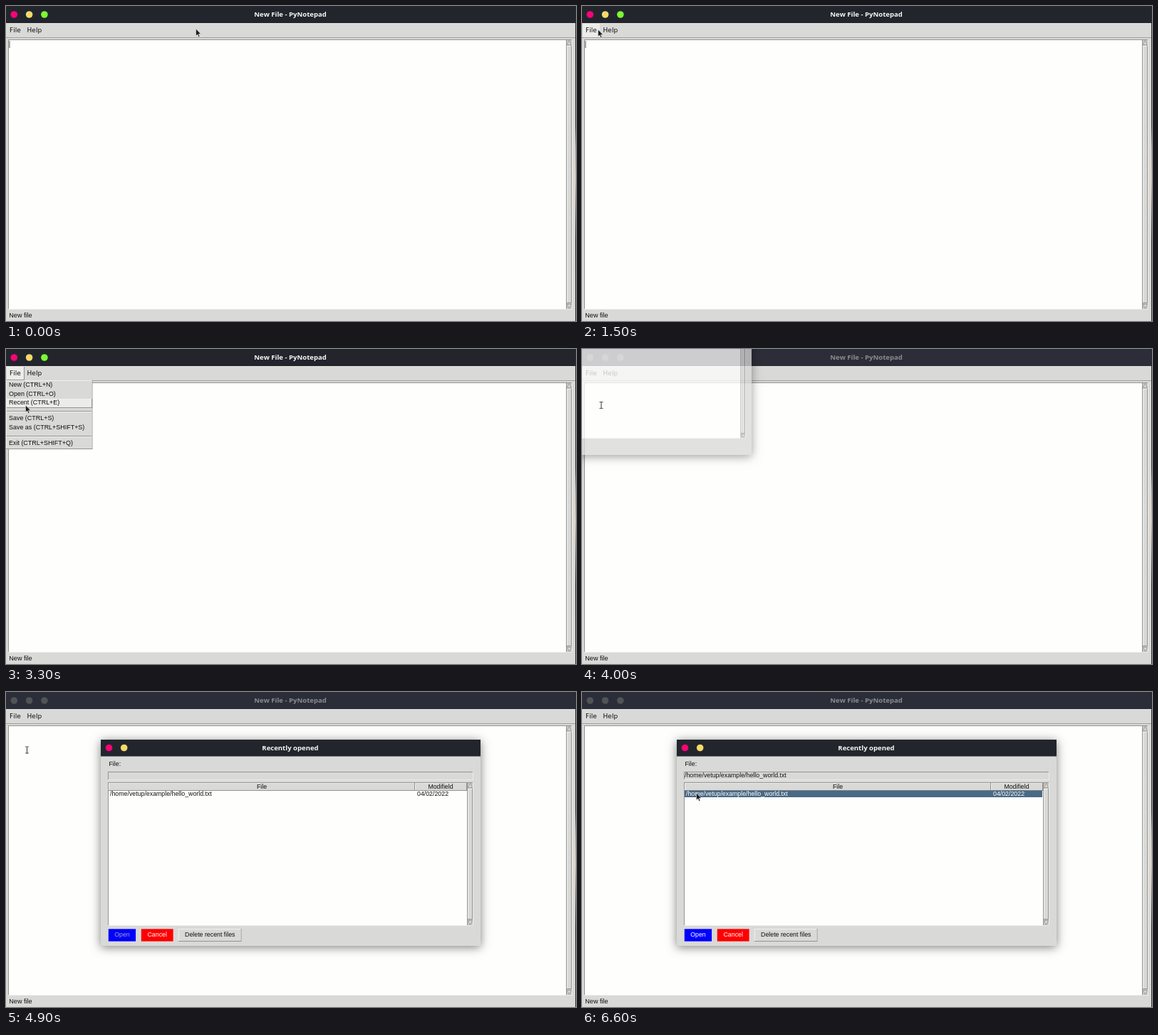
An HTML page with a canvas for the animation above (8 s loop, 800 by 443 pixels).

```html
<!DOCTYPE html>
<html lang="en">
<head>
<meta charset="utf-8">
<title>PyNotepad</title>
<style>
  html, body { margin: 0; width: 100%; height: 100%; overflow: hidden; }
  canvas { display: block; }
</style>
</head>
<body>
<canvas id="stage" width="800" height="443"></canvas>
<script>
const LOOP = 8000, STEP = 100;
const GRAY = '#d9d9d7', LIGHT = '#ececea', DARK = '#939391', WHITE = '#fefefd', INK = '#101010';
const SANS = '"Liberation Sans", Arial, sans-serif';
const BODY_FONT = '8.8px ' + SANS;
const MENU_FONT = '8.95px ' + SANS;
const BAR_FONT = '9px "DejaVu Sans", sans-serif';
const TITLE_FONT = 'bold 9.55px "Noto Sans", sans-serif';
const PATH = '/home/vetup/example/hello_world.txt';
const DIALOG = { x: 133, y: 67, w: 533, h: 290 };

const MENU = [
  ['New (CTRL+N)', 45], ['Open (CTRL+O)', 57.5], ['Recent (CTRL+E)', 70],
  ['Save (CTRL+S)', 92], ['Save as (CTRL+SHIFT+S)', 104.5], ['Exit (CTRL+SHIFT+Q)', 126.5]
];

// Pointer path: time, x, y
const POINTER = [
  [0, 266, 32], [400, 266, 32], [600, 245, 32], [900, 152, 32], [1200, 58, 33],
  [1300, 38, 33], [1400, 24, 33], [1500, 22, 33], [2800, 22, 33], [2900, 23, 42],
  [3100, 26, 78], [3200, 27, 89], [3300, 27, 79], [4800, 27, 79], [4900, 29.5, 81.5],
  [5100, 58, 97], [5400, 130, 124], [5500, 150, 133], [5600, 158, 139], [5700, 160, 142],
  [LOOP, 160, 142]
];

const screen = document.getElementById('stage').getContext('2d');
const layer = document.createElement('canvas');
layer.width = DIALOG.w;
layer.height = DIALOG.h;
const dialogContext = layer.getContext('2d');
let c = screen;

function box(x, y, w, h, color) {
  c.fillStyle = color;
  c.fillRect(x, y, w, h);
}

function bevel(x, y, w, h, fill, sunken = false) {
  box(x, y, w, h, sunken ? LIGHT : DARK);
  box(x, y, w - 1, h - 1, sunken ? DARK : '#f0f0ee');
  box(x + 1, y + 1, w - 2, h - 2, fill);
}

function text(string, x, y, font = BODY_FONT, color = INK, align = 'left') {
  c.font = font;
  c.fillStyle = color;
  c.textAlign = align;
  c.fontKerning = 'none';
  c.fillText(string, x, y);
}

function dot(x, y, color) {
  c.fillStyle = color;
  c.beginPath();
  c.arc(x, y, 4.8, 0, 7);
  c.fill();
}

function shape(points, fill, stroke, width = 1) {
  c.beginPath();
  points.forEach(([x, y]) => c.lineTo(x, y));
  c.closePath();
  c.fillStyle = fill;
  c.fill();
  c.strokeStyle = stroke;
  c.lineWidth = width;
  c.stroke();
}

function scrollbar(x, top, bottom) {
  const mid = x + 4.5;
  bevel(x, top, 9, bottom - top, '#c6c6c4', true);
  bevel(x + 1, top + 9, 7, bottom - top - 18, GRAY);
  shape([[mid, top + 1.5], [x + 7.5, top + 7.5], [x + 1.5, top + 7.5]], GRAY, DARK, 0.8);
  shape([[mid, bottom - 1.5], [x + 7.5, bottom - 7.5], [x + 1.5, bottom - 7.5]], GRAY, DARK, 0.8);
}

function pointerAt(t) {
  const i = POINTER.findIndex(key => key[0] > t);
  const [t0, x0, y0] = POINTER[i - 1], [t1, x1, y1] = POINTER[i];
  const k = (t - t0) / (t1 - t0);
  return { x: x0 + (x1 - x0) * k, y: y0 + (y1 - y0) * k };
}

function drawPointer({ x, y }, beam) {
  c.save();
  c.translate(x, y);
  if (beam) {
    box(-0.5, -4, 1, 9, '#333');
    box(-2.5, -5, 5, 1, '#555');
    box(-2.5, 4, 5, 1, '#555');
  } else {
    shape([[0.5, 0], [0.5, 10], [2.8, 8], [4.3, 11.6], [5.9, 10.9], [4.4, 7.4], [7.4, 7.2]],
      '#1c1c1c', 'rgba(235,235,235,.75)', 0.8);
  }
  c.restore();
}

function drawWindow(t, pointer) {
  const focused = t < 4000;
  const menuOpen = t >= 1800 && t < 3900;
  const caretOn = focused && (t + 300) % 900 < 600;
  box(0, 0, 800, 443, GRAY);
  box(0, 0, 799, 24, focused ? '#22262c' : '#2b2e38');
  const dots = focused ? ['#fb0276', '#f4da68', '#7cfa35'] : Array(3).fill('#525357');
  dots.forEach((color, i) => dot(11.3 + 21.3 * i, 12, color));
  text('New File - PyNotepad', 399, 15.3, TITLE_FONT, focused ? '#f6f6f6' : '#8b8c90', 'center');

  box(0, 24, 799, 1, '#e2e2e0');
  box(0, 44.2, 799, 0.8, DARK);
  if (menuOpen) bevel(1, 25, 25, 19, LIGHT);
  else if (t < 1800 && pointer.x < 25) box(1, 25, 24, 19, LIGHT);
  else if (t < 1800 && pointer.x < 54) box(25, 25, 29, 19, LIGHT);
  text('File', 5, 37.2, BAR_FONT);
  text('Help', 29.6, 37.2, BAR_FONT);

  bevel(3, 47, 793, 380, WHITE, true);
  scrollbar(786, 47, 427);
  box(795, 46, 4, 382, GRAY);
  text('New file', 4.3, 438.3, '9.1px ' + SANS);

  const edge = c.createLinearGradient(0, 0, 0, 443);
  [[0, '#25282d'], [0.38, '#3a3a3c'], [0.45, '#a09890'], [0.55, '#d8b89a'], [0.65, '#77716c'], [0.75, '#25282d'], [1, '#333']]
    .forEach(([stop, color]) => edge.addColorStop(stop, color));
  box(799, 0, 1, 443, edge);

  if (caretOn) box(4.5, 49, 1, 10, '#555');
  if (menuOpen) drawMenu(t, pointer);
}

function drawMenu(t, pointer) {
  bevel(0, 44, 121.5, 97, GRAY);
  for (const y of [87, 122]) {
    box(1, y, 119, 1, DARK);
    box(1, y + 1, 119, 1, '#f4f4f2');
  }
  for (const [label, y] of MENU) {
    const hovered = pointer.y >= y && pointer.y < y + 12.5;
    const first = y === 45 && t >= 1900 && pointer.y < 45;
    const nearSave = y === 92 && pointer.y > 88;
    if (hovered || first || nearSave) bevel(1, Math.floor(y), 120, 13, LIGHT);
    text(label, 4, y + 8.3, MENU_FONT);
  }
}

function button(label, x, w, fill, color) {
  if (fill === GRAY) bevel(x, 333, w, 18, fill);
  else box(x, 333.3, w, 17.3, fill);
  text(label, x + w / 2, 344, BODY_FONT, color, 'center');
}

function paintDialog(t, pointer) {
  const selected = t >= 6500, chosen = t >= 6600;
  const overHeading = pointer.x > 143 && pointer.y >= 127 && pointer.y < 138;
  c = dialogContext;
  c.save();
  c.translate(-DIALOG.x, -DIALOG.y);
  box(DIALOG.x, DIALOG.y, DIALOG.w, DIALOG.h, GRAY);
  box(DIALOG.x, DIALOG.y, DIALOG.w, 23.5, '#22262c');
  dot(144.5, 78.5, '#fb0276');
  dot(165.7, 78.5, '#f4da68');
  text('Recently opened', 399, 81.8, TITLE_FONT, '#f6f6f6', 'center');

  text('File:', 144.5, 103.8);
  bevel(143, 112, 513, 12, GRAY, true);
  if (chosen) text(PATH, 144, 120.2);

  bevel(143, 127, 513, 202, WHITE, true);
  bevel(144, 128, 430, 11, overHeading ? LIGHT : GRAY);
  bevel(574, 128, 73, 11, GRAY);
  text('File', 359, 136.1, BODY_FONT, INK, 'center');
  text('Modifield', 610, 136.1, BODY_FONT, INK, 'center');
  if (selected) box(144, 138.5, 502, 9.5, '#4a6984');
  const rowInk = selected ? '#fff' : INK;
  text(PATH, 146, 146, BODY_FONT, rowInk);
  text('04/02/2022', 577, 146, BODY_FONT, rowInk);
  scrollbar(647, 127, 329);

  button('Open', 143.8, 38.3, '#0000fe', chosen ? '#fff' : '#a3a3a3');
  button('Cancel', 189.8, 44.8, '#fe0000', '#fff');
  button('Delete recent files', 242, 88.5, GRAY, INK);
  c.restore();
  c = screen;
}

// The shadow is clipped to the outside so it does not show through a translucent window.
function drawShadow(x, y, w, h) {
  c.save();
  c.beginPath();
  c.rect(0, 0, 800, 443);
  c.rect(x, y, w, h);
  c.clip('evenodd');
  c.shadowColor = 'rgba(0,0,0,.5)';
  c.shadowBlur = 13;
  c.shadowOffsetY = 2;
  box(x, y, w, h, GRAY);
  c.restore();
}

function drawDialog(t, pointer) {
  paintDialog(t, pointer);
  const opening = t < 4100;
  const scale = opening ? 0.82 : 1;
  const w = Math.round(DIALOG.w * scale), h = Math.round(DIALOG.h * scale);
  const x = opening ? 238 - w : DIALOG.x, y = opening ? 149 - h : DIALOG.y;
  c.save();
  c.globalAlpha = opening ? 0.77 : 1;
  drawShadow(x, y, w, h);
  c.drawImage(layer, x, y, w, h);
  c.restore();
}

function render(now) {
  const t = Math.floor((now % LOOP) / STEP) * STEP;
  const pointer = pointerAt(t);
  drawWindow(t, pointer);
  if (t >= 4000) drawDialog(t, pointer);
  drawPointer(pointer, t >= 3900 && pointer.x < DIALOG.x);
}

const start = performance.now();
function tick() {
  render(performance.now() - start);
  requestAnimationFrame(tick);
}
tick();
</script>
</body>
</html>
```
